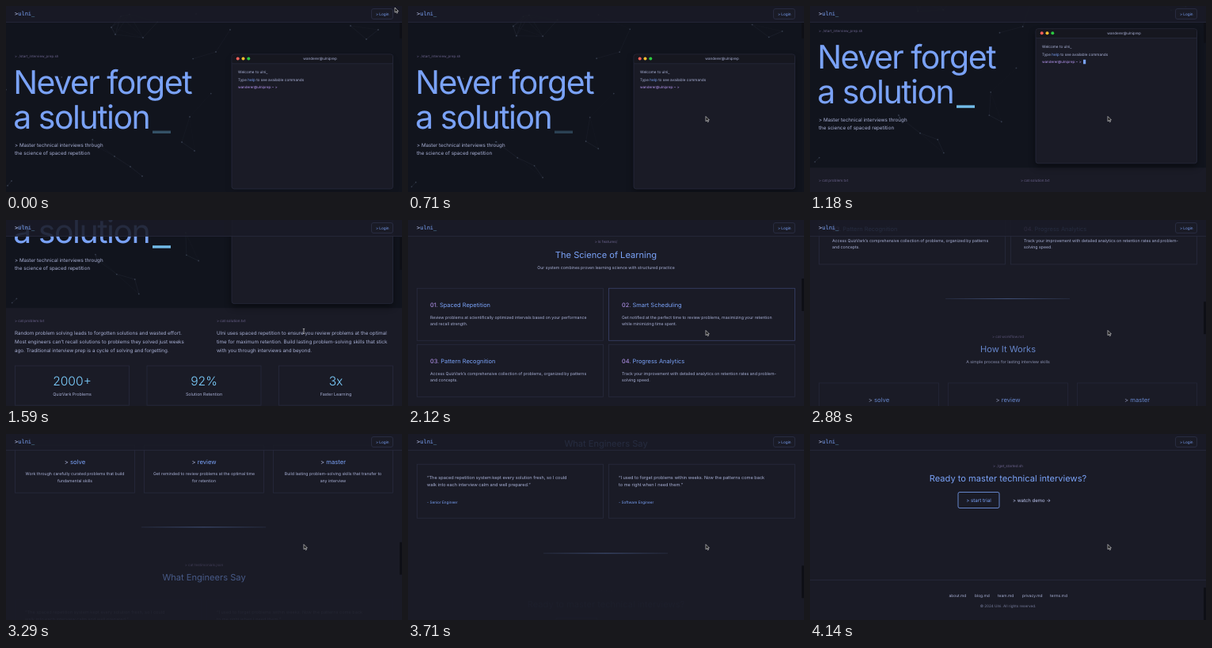
Animation, 500 px wide and 235 px high, one loop 4.23 s. Source, as an HTML page with a canvas:

```html
<!DOCTYPE html>
<html lang="en">
<head>
<meta charset="utf-8">
<title>Interview prep</title>
<style>
  html, body { margin: 0; width: 100%; height: 100%; overflow: hidden; background: #11141d; }
  canvas, svg { position: absolute; left: 0; top: 0; width: 500px; height: 235px; }
  text { font-family: Inter, Roboto, sans-serif; text-rendering: geometricPrecision; white-space: pre; }
  .mono { font-family: "DejaVu Sans Mono", "Noto Sans Mono", monospace; }
</style>
</head>
<body>
<canvas></canvas>
<svg viewBox="0 0 500 235" xmlns="http://www.w3.org/2000/svg">
  <defs>
    <linearGradient id="rule">
      <stop offset="0" stop-color="#7aa2f7" stop-opacity=".1"/>
      <stop offset=".5" stop-color="#7aa2f7" stop-opacity=".4"/>
      <stop offset="1" stop-color="#7aa2f7" stop-opacity=".1"/>
    </linearGradient>
    <filter id="soft"><feGaussianBlur stdDeviation="5"/></filter>
  </defs>
</svg>
<script>
const LOOP = 4230, W = 500, H = 235, PAGE = 1347, HERO = 236.5;
const C = {
  bg: '#1a1b26', dark: '#16171f', line: '#272a3d', blue: '#7aa2f7', cyan: '#7dcfff',
  purple: '#bb9af7', text: '#a9b1d6', bright: '#c0caf5', muted: '#6a628c'
};
const svg = document.querySelector('svg');

function add(parent, tag, attrs) {
  const el = document.createElementNS(svg.namespaceURI, tag);
  for (const k in attrs) el.setAttribute(k, attrs[k]);
  parent.appendChild(el);
  return el;
}
const group = parent => add(parent, 'g', {});
const rect = (g, x, y, width, height, fill, more) =>
  add(g, 'rect', { x, y, width, height, fill, ...more });
const box = (g, x, y, w, h, rx = 0, fill = C.bg, stroke = C.line) =>
  rect(g, x + .5, y + .5, w - 1, h - 1, fill, { stroke, 'stroke-width': .8, rx });

// y is the optical middle of the line; str may be a list of [string, colour] runs
function text(g, x, y, str, size, fill = C.text, more = {}) {
  const el = add(g, 'text', { x, y: y + size * .34, fill, 'font-size': size, ...more });
  if (typeof str === 'string') el.textContent = str;
  else for (const [s, color] of str) add(el, 'tspan', { fill: color }).textContent = s;
  return el;
}
const mid = (g, x, y, str, size, fill, more) =>
  text(g, x, y, str, size, fill, { 'text-anchor': 'middle', ...more });
const lines = (fn, g, x, y, step, list, size, fill) =>
  list.forEach((s, i) => fn(g, x, y + i * step, s, size, fill));
const divider = y => rect(page, 171, y - .5, 157, 1, 'url(#rule)');

function heading(g, y, cmd, title, sub) {
  mid(g, 250, y, cmd, 4.6, C.muted);
  mid(g, 250, y + 16, title, 11.1, C.blue);
  if (sub) mid(g, 250, y + 32, sub, 5.2);
}

const page = group(svg);

// Hero
text(page, 11, 64, '> ./start_interview_prep.sh', 4.4, C.muted);
lines((g, x, y, s) => text(g, x, y, s, 41, C.blue, { 'letter-spacing': -1.5 }),
  page, 9.2, 96.8, 44, ['Never forget', 'a solution']);
const caret = rect(page, 185, 157.6, 23, 3.4, C.cyan);
lines(text, page, 11, 176, 10, ['> Master technical interviews through', 'the science of spaced repetition'], 6.25, C.text);
rect(page, 0, HERO, W, PAGE - HERO, C.bg);

// Terminal
const shade = rect(page, 284.5, 66, 204, 169, '#000', { filter: 'url(#soft)' });
box(page, 284.5, 60.5, 204.5, 171, 3);
rect(page, 285.5, 61.5, 202.5, 11, C.dark, { rx: 2 });
rect(page, 285.5, 72.5, 202.5, .7, C.line);
['#f7605a', '#f9bd2e', '#2bc840'].forEach((fill, i) => add(page, 'circle', { cx: 292.7 + i * 6.8, cy: 66.5, r: 2, fill }));
mid(page, 396.5, 66.5, 'wanderer@ulniprep', 4.6);
text(page, 293, 83.8, 'Welcome to ulni_', 4.69, C.text);
text(page, 293, 93.3, [['Type ', C.text], ['help', C.blue], [' to see available commands', C.text]], 4.69);
text(page, 293, 102.8, 'wanderer@ulniprep:~ >', 4.45, C.purple);
const block = rect(page, 345, 100, 3.2, 5.5, C.blue);

// Problem and solution
text(page, 11, 253, '> cat problem.txt', 4.6, C.muted);
text(page, 266, 253, '> cat solution.txt', 4.6, C.muted);
const intro = group(page);
lines(text, intro, 11, 268, 11, [
  'Random problem solving leads to forgotten solutions and wasted effort.',
  'Most engineers can’t recall solutions to problems they solved just weeks',
  'ago. Traditional interview prep is a cycle of solving and forgetting.'], 6.25);
lines(text, intro, 266, 268, 11, [
  'Ulni uses spaced repetition to ensure you review problems at the optimal',
  'time for maximum retention. Build lasting problem-solving skills that stick',
  'with you through interviews and beyond.'], 6.25);
[['2000+', 'QuizVark Problems'], ['92%', 'Solution Retention'], ['3x', 'Faster Learning']].forEach(([n, label], i) => {
  const x = 11 + i * 166.5;
  box(intro, x, 309, 145, 51);
  mid(intro, x + 72.5, 329, n, 15.6, C.cyan, { 'font-weight': 300 });
  mid(intro, x + 72.5, 346, label, 5.4);
});

// Features
divider(404);
const features = group(page), cards = [];
heading(features, 452, '> ls features/', 'The Science of Learning',
  'Our system combines proven learning science with structured practice');
[
  ['Spaced Repetition', 'Review problems at scientifically optimized intervals based on your performance', 'and recall strength.'],
  ['Smart Scheduling', 'Get notified at the perfect time to review problems, maximizing your retention', 'while minimizing time spent.'],
  ['Pattern Recognition', 'Access QuizVark’s comprehensive collection of problems, organized by patterns', 'and concepts.'],
  ['Progress Analytics', 'Track your improvement with detailed analytics on retention rates and problem-', 'solving speed.']
].forEach(([title, ...body], i) => {
  const x = 11 + i % 2 * 242, y = 510 + (i >> 1) * 71;
  cards.push({ x, y, w: 236, h: 67, el: box(features, x, y, 236, 67) });
  text(features, x + 17, y + 22, [[`0${i + 1}. `, C.purple], [title, C.blue]], 7.45);
  lines(text, features, x + 17, y + 37, 8.2, body, 5.2);
});

// Steps
divider(691);
const steps = group(page);
heading(steps, 739, '> cat workflow.md', 'How It Works', 'A simple process for lasting interview skills');
[
  ['solve', 'Work through carefully curated problems that build', 'fundamental skills'],
  ['review', 'Get reminded to review problems at the optimal time', 'for retention'],
  ['master', 'Build lasting problem-solving skills that transfer to', 'any interview']
].forEach(([title, ...body], i) => {
  const x = 11 + i * 163;
  cards.push({ x, y: 797, w: 152, h: 61, el: box(steps, x, 797, 152, 61) });
  mid(steps, x + 76, 819, [['> ', C.text], [title, C.blue]], 7.7);
  lines(mid, steps, x + 76, 834, 8.2, body, 5.2);
});

// Testimonials
divider(901);
const saysHead = group(page), says = group(page);
heading(saysHead, 949, '> cat testimonials.json', 'What Engineers Say');
[
  ['“The spaced repetition system kept every solution fresh, so I could', 'walk into each interview calm and well prepared.”', '- Senior Engineer'],
  ['“I used to forget problems within weeks. Now the patterns come back', 'to me right when I need them.”', '- Software Engineer']
].forEach(([a, b, who], i) => {
  const x = 11 + i * 242;
  box(says, x, 991, 236, 69);
  lines(text, says, x + 13, 1008, 9, [a, b], 5.6);
  text(says, x + 13, 1040, who, 4.7, C.blue);
});

// Call to action and footer
divider(1104);
const cta = group(page);
heading(cta, 1152, '> ./get_started.sh', 'Ready to master technical interviews?');
box(cta, 186.5, 1185, 53, 21, 2, C.bg, C.blue);
mid(cta, 213, 1196, '> start trial', 6.2, C.blue);
text(cta, 256, 1196, '> watch demo →', 6, C.bright);
rect(page, 0, 1296, W, .8, C.line);
[['about', 175.5], ['blog', 208], ['team', 237], ['privacy', 268], ['terms', 303]].forEach(([s, x]) =>
  text(page, x, 1316, s + '.md', 4.9));
mid(page, 250, 1329, '© 2024 Ulni. All rights reserved.', 4.65, '#747a99');

// Fixed parts
const thumb = rect(svg, 497, 0, 3, H * H / PAGE, '#0e0f16');
rect(svg, 0, 0, W, 20.5, C.bg, { 'fill-opacity': .88 });
rect(svg, 0, 20, W, .8, C.line);
text(svg, 11, 10, [['>', C.bright], ['ulni', C.blue], ['_', C.cyan]], 7, C.blue, { class: 'mono' });
box(svg, 461, 3, 28, 14, 2.5, C.bg, '#2c3047');
mid(svg, 475.3, 10, '> Login', 4.7, C.blue);
const arrow = add(svg, 'path', {
  d: 'M0 0V6.2L1.5 4.9 2.5 7.1 3.5 6.6 2.5 4.5H4.4Z', fill: '#111', stroke: '#eee', 'stroke-width': .6
});
const beam = add(svg, 'path', {
  d: 'M-1.2 -3.2Q0 -3.2 0 -2.4Q0 -3.2 1.2 -3.2M0 -2.4V2.4M-1.2 3.2Q0 3.2 0 2.4Q0 3.2 1.2 3.2',
  fill: 'none', stroke: '#ddd', 'stroke-width': .7
});

// Drifting network behind the hero
let seed = 11;
const rnd = () => (seed = seed * 16807 % 2147483647) / 2147483647;
const spots = [[145, 13], [133, 27], [138, 36], [173, 40], [240, 10], [283, 30], [265, 58], [232, 140], [222, 172],
  [238, 183], [137, 190], [157, 203], [172, 215], [2, 227], [7, 221], [435, 25], [455, 42], [470, 30]];
while (spots.length < 28) spots.push([rnd() * W, rnd() * HERO]);
const dots = spots.map(([x, y]) => ({ x, y, vx: (rnd() - .5) * 8, vy: (rnd() - .5) * 8 }));

const canvas = document.querySelector('canvas'), ctx = canvas.getContext('2d');
const dpr = window.devicePixelRatio || 1;
canvas.width = W * dpr;
canvas.height = H * dpr;

function drawNet(t, scroll) {
  ctx.setTransform(dpr, 0, 0, dpr, 0, 0);
  ctx.fillStyle = '#11141d';
  ctx.fillRect(0, 0, W, H);
  if (scroll > HERO) return;
  ctx.translate(0, -scroll);
  const now = dots.map(d => [d.x + d.vx * t / 1000, d.y + d.vy * t / 1000]);
  ctx.lineWidth = .6;
  now.forEach(([x, y], i) => {
    ctx.fillStyle = 'rgba(130,145,175,.3)';
    ctx.beginPath();
    ctx.arc(x, y, .9, 0, 7);
    ctx.fill();
    for (const [u, v] of now.slice(i + 1)) {
      const d = Math.hypot(x - u, y - v);
      if (d > 45) continue;
      ctx.strokeStyle = `rgba(130,145,175,${.22 * (1 - d / 50)})`;
      ctx.beginPath();
      ctx.moveTo(x, y);
      ctx.lineTo(u, v);
      ctx.stroke();
    }
  });
}

const ramp = (t, a, b) => {
  const p = Math.min(1, Math.max(0, (t - a) / (b - a)));
  return p * p * (3 - 2 * p);
};

// Scroll position: [ms, px], smoothed with monotone tangents
const keys = [[0, 0], [1040, 0], [1180, 32], [1400, 78], [1590, 125], [1850, 325], [2120, 424], [2530, 483],
  [2760, 520], [3020, 690], [3290, 783], [3580, 850], [3840, 1055], [4080, 1112], [LOOP, 1112]];
const slope = i => (keys[i + 1][1] - keys[i][1]) / (keys[i + 1][0] - keys[i][0]);
const tangents = keys.map((_, i) => {
  if (!i || i === keys.length - 1) return 0;
  const a = slope(i - 1), b = slope(i);
  return a * b > 0 ? 2 * a * b / (a + b) : 0;
});
function scrollAt(t) {
  let i = 0;
  while (i < keys.length - 2 && t >= keys[i + 1][0]) i++;
  const [t0, a] = keys[i], [t1, b] = keys[i + 1], d = t1 - t0, p = (t - t0) / d, q = 1 - p;
  return a * q * q * (1 + 2 * p) + b * p * p * (3 - 2 * p)
    + d * p * q * (tangents[i] * q - tangents[i + 1] * p);
}

const fades = [[intro, 1180, 1520], [features, 1620, 2020], [steps, 2600, 3000],
  [saysHead, 3140, 3460], [says, 3235, 3600], [cta, 3680, 4040]];
const textRows = [[263, 295], [543, 559], [614, 631], [830, 846], [1004, 1021]];

function draw(t) {
  const s = scrollAt(t), move = ramp(t, 60, 680);
  const px = 491 - 115 * move, py = 2 + 137.5 * move, my = s + py;
  drawNet(t, s);
  page.setAttribute('transform', `translate(0 ${-s})`);
  thumb.setAttribute('y', s / PAGE * H);
  caret.setAttribute('opacity', .5 + .5 * Math.cos((t - 1385) * Math.PI / 1000));
  block.setAttribute('opacity', (t + 900) % 1000 < 500 ? 1 : 0);
  shade.setAttribute('opacity', .1 + .35 * ramp(t, 560, 800));

  for (const [g, a, b] of fades) g.setAttribute('opacity', ramp(t, a, b));
  for (const c of cards) {
    const over = px > c.x && px < c.x + c.w && my > c.y && my < c.y + c.h;
    c.el.setAttribute('stroke', over ? '#39426a' : C.line);
  }

  const onText = move === 1 && textRows.some(([a, b]) => my > a && my < b);
  arrow.setAttribute('transform', `translate(${px} ${py})`);
  beam.setAttribute('transform', `translate(${px} ${py + 1})`);
  arrow.setAttribute('opacity', onText ? 0 : 1);
  beam.setAttribute('opacity', onText ? 1 : 0);
}

const start = performance.now();
(function tick() {
  draw((performance.now() - start) % LOOP);
  requestAnimationFrame(tick);
})();
</script>
</body>
</html>
```
